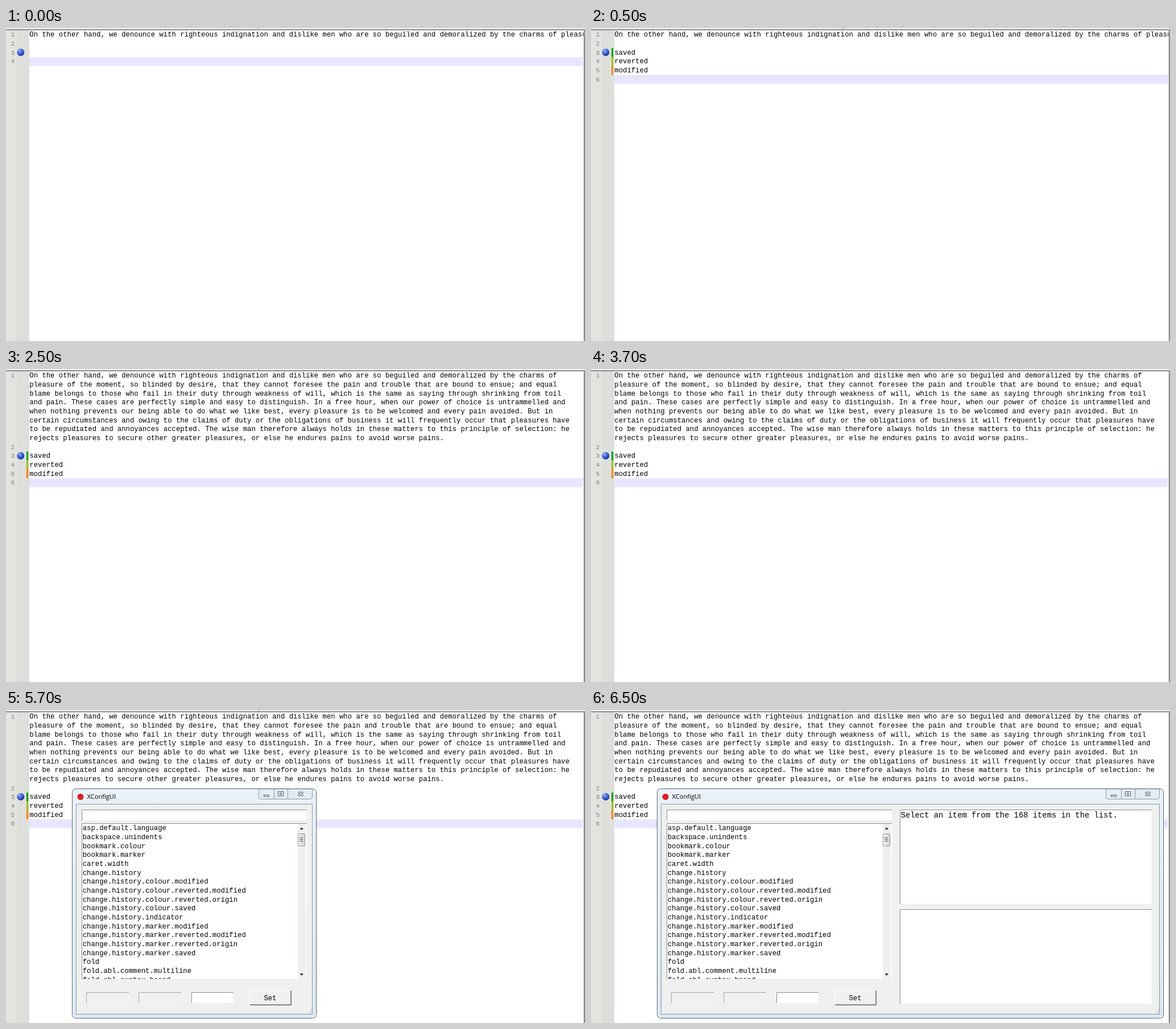
These frames come from a looping animation (1018x550 px, 8000 ms). An HTML page:

```html
<!DOCTYPE html>
<html lang="en">
<head>
<meta charset="utf-8">
<title>Editor settings</title>
<style>
  html, body { margin: 0; width: 100%; height: 100%; overflow: hidden; background: #fff; }
  svg { display: block; width: 1018px; height: 550px; }
  text { font: 12.287px "Liberation Mono", "Courier New", monospace; white-space: pre; fill: #000; }
  .num { font-size: 11.4px; fill: #808080; }
  .title { font: 11.1px "Open Sans", sans-serif; }
  .big { font-size: 13.82px; }
</style>
</head>
<body>
<svg id="stage" viewBox="0 0 1018 550"></svg>
<script>
const stage = document.getElementById('stage');
const ROW = 15.67, TOP = 4;
const starts = [0, 500, 2500, 4500, 6500], LOOP = 8000;

const prose = [
  'On the other hand, we denounce with righteous indignation and dislike men who are so beguiled and demoralized by the charms of',
  'pleasure of the moment, so blinded by desire, that they cannot foresee the pain and trouble that are bound to ensue; and equal',
  'blame belongs to those who fail in their duty through weakness of will, which is the same as saying through shrinking from toil',
  'and pain. These cases are perfectly simple and easy to distinguish. In a free hour, when our power of choice is untrammelled and',
  'when nothing prevents our being able to do what we like best, every pleasure is to be welcomed and every pain avoided. But in',
  'certain circumstances and owing to the claims of duty or the obligations of business it will frequently occur that pleasures have',
  'to be repudiated and annoyances accepted. The wise man therefore always holds in these matters to this principle of selection: he',
  'rejects pleasures to secure other greater pleasures, or else he endures pains to avoid worse pains.'
];
const changes = [['saved', '#00a000'], ['reverted', '#a0c000'], ['modified', '#ff8000']];
const history = kind => ['modified', 'reverted.modified', 'reverted.origin', 'saved']
  .map(s => `change.history.${kind}.${s}`);
const options = ['asp.default.language', 'backspace.unindents', 'bookmark.colour', 'bookmark.marker',
  'caret.width', 'change.history', ...history('colour'), 'change.history.indicator',
  ...history('marker'), 'fold', 'fold.abl.comment.multiline', 'fold.abl.syntax.based'];

const rect = (x, y, w, h, fill, more = '') =>
  `<rect x="${x}" y="${y}" width="${w}" height="${h}" fill="${fill}" ${more}/>`;
const text = (x, y, s, cls = '') => `<text x="${x}" y="${y}" class="${cls}">${s}</text>`;
const path = (d, stroke, fill = 'none', more = '') =>
  `<path d="${d}" stroke="${stroke}" fill="${fill}" ${more}/>`;

// Box with separate top-left and bottom-right edge colours
const bevel = (x, y, w, h, fill, dark = '#8c8c8c', light = '#f8f8f8') =>
  rect(x, y, w, h, fill) +
  path(`M${x + .5} ${y + h}V${y + .5}H${x + w}`, dark) +
  path(`M${x + 1} ${y + h - .5}H${x + w - .5}V${y + 1}`, light);

const defs = `<defs>
  <radialGradient id="ball" cx=".35" cy=".3" r=".75">
    <stop offset="0" stop-color="#9db8f5"/><stop offset=".45" stop-color="#426ad8"/>
    <stop offset="1" stop-color="#1c2f9c"/></radialGradient>
  <linearGradient id="glass" x2="0" y2="1">
    <stop offset="0" stop-color="#eaf1f8"/><stop offset="1" stop-color="#dbe8f4"/></linearGradient>
  <linearGradient id="thumb">
    <stop offset="0" stop-color="#f3f3f3"/><stop offset="1" stop-color="#cfcfd1"/></linearGradient>
  <clipPath id="page">${rect(41, 4, 974, 546, '#000')}</clipPath>
  <clipPath id="list">${rect(134, 200, 379, 272.5, '#000')}</clipPath>
</defs>`;

function editor(step) {
  const wrapped = step > 1;
  const body = wrapped ? prose : [prose[0] + ' pleasure'];
  const first = body.length;
  const marks = step ? changes : [];
  const caretRow = step ? first + 4 : 3;
  const y = row => TOP + row * ROW;
  const base = row => y(row) + 11.3;

  let s = rect(0, 0, 1018, 550, '#fff') + rect(0, 0, 19, 550, '#e2e4e0') + rect(19, 0, 22, 550, '#dddfdb') +
    rect(41, y(caretRow), 973.5, ROW, '#e8e6ff');
  s += '<g clip-path="url(#page)">' + body.map((line, i) => text(41.3, base(i), line)).join('') + '</g>';
  marks.forEach(([word, colour], i) => {
    const row = first + 1 + i;
    s += rect(36, y(row), 3, ROW, colour) + text(41.3, base(row), word);
  });
  s += text(8.5, base(0), 1, 'num');
  for (let n = 2; n <= caretRow - first + 2; n++) s += text(8.5, base(first + n - 2), n, 'num');
  s += `<circle cx="25.8" cy="${y(first + 1) + 7.4}" r="6.5" fill="url(#ball)"/>`;
  return s + rect(0, 0, 1018, 2, '#f0f0f0') + rect(0, 2, 1018, 1, '#a0a0a0') + rect(0, 3, 1016, 1, '#787878') +
    rect(443, 0, 2, 1, '#777') + rect(1015, 4, 1, 546, '#e3e3e3') + rect(1016, 3, 2, 547, '#858585');
}

function controls(dx) {
  return `<g transform="translate(${dx})">` +
    path('M444.5 139V153Q444.5 156.5 448 156.5H535Q538.5 156.5 538.5 153V139M471.5 139V156M495.5 139V156', '#8d9baa', '#e3ebf3') +
    rect(453.5, 149.5, 9, 2.5, '#fff', 'stroke="#4b535e"') +
    rect(478.5, 143.5, 9, 7.5, '#fff', 'stroke="#4b535e"') + rect(481.5, 146, 3, 2.5, '#fff', 'stroke="#4b535e"') +
    path('M514 144L522 151M522 144L514 151', '#4b535e', 'none', 'stroke-width="3.4"') +
    path('M514 144L522 151M522 144L514 151', '#fff', 'none', 'stroke-width="1.4"') + '</g>';
}

function grip(dx) {
  let s = '';
  for (let i = 0; i < 3; i++)
    for (let j = 0; j <= i; j++) s += rect(536 + dx - j * 3, 525 + i * 3, 1.5, 1.5, '#bcbfbe');
  return s;
}

function dialog(wide) {
  const dx = wide ? 461 : 0;
  let s = rect(116.5, 138.5, 429 + dx, 403, 'url(#glass)', 'rx="6" stroke="#4c5a66"') +
    rect(117.5, 139.5, 427 + dx, 401, 'none', 'rx="5" stroke="#f8fcff"') +
    rect(123.5, 165.5, 415 + dx, 369, '#eff1ee', 'stroke="#8798a6"') +
    '<circle cx="131" cy="152.5" r="5.5" fill="#d91f26"/>' +
    text(142.5, 156, 'XConfigUI', 'title') + controls(dx) +
    bevel(133, 175, 396, 19, '#fff') + bevel(133, 199, 396, 274, '#fff');

  s += '<g clip-path="url(#list)">' +
    options.map((name, i) => text(134.7, 211.2 + i * 15.67, name)).join('') + '</g>';
  s += rect(513, 200, 14, 272, '#eeeff0') +
    rect(513.5, 217.5, 12, 21.5, 'url(#thumb)', 'rx="1" stroke="#989898"') +
    path('M516 224.5H522M516 227.5H522M516 230.5H522', '#555') +
    path('M516.5 210L519.8 206L523 210Z', 'none', '#333') +
    path('M516.5 463L519.8 467L523 463Z', 'none', '#333');

  s += bevel(141, 496, 75, 19, '#eff1ee', '#a2a4a2') + bevel(233, 496, 75, 19, '#eff1ee', '#a2a4a2') +
    bevel(326, 496, 74, 19, '#fff') +
    bevel(428, 492, 74, 27, '#eff1ee', '#fff', '#686868') +
    path('M429 517.5H500.5V493', '#a5a5a5') + text(453.5, 510, 'Set');

  if (wide)
    s += bevel(543, 175, 443, 166, '#fff') + bevel(543, 350, 443, 166, '#fff') +
      text(544.7, 189, 'Select an item from the 168 items in the list.', 'big');
  return s + grip(dx);
}

let shown = -1;
function tick() {
  const t = performance.now() % LOOP;
  const step = starts.filter(at => t >= at).length - 1;
  if (step !== shown) {
    shown = step;
    stage.innerHTML = defs + editor(step) + (step > 2 ? dialog(step === 4) : '');
  }
  requestAnimationFrame(tick);
}
tick();
</script>
</body>
</html>
```
